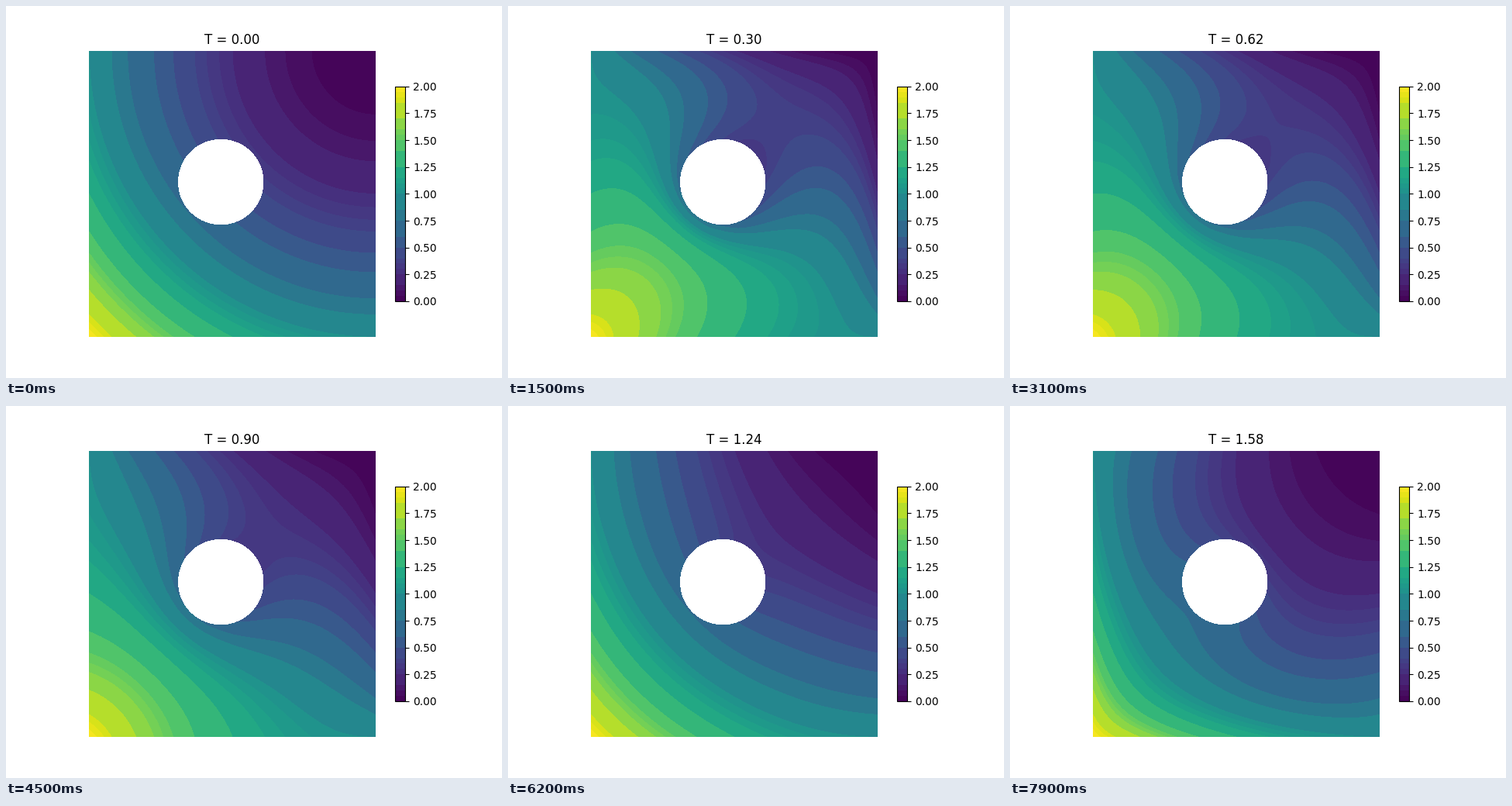
A matplotlib script for the animation above (8 s loop, 640 by 480 pixels).

```python
import numpy as np
import matplotlib.pyplot as plt
from matplotlib.animation import FuncAnimation
from matplotlib.cm import ScalarMappable
from matplotlib.colors import BoundaryNorm, ListedColormap
from matplotlib.patches import Circle

FRAMES, INTERVAL = 80, 100
DT = 0.02          # model time per frame
N, SUB = 80, 270   # grid cells per side, solver steps per frame
DIFF = 0.5         # diffusivity
WIND, OMEGA = 3.1, 1.5
HOLE, RADIUS = (0.46, 0.5415), 0.148

LEVELS = np.array([0, .05, .1, .15, .25, .3, .35, .4, .5, .6, .75, .85, 1,
                   1.05, 1.1, 1.15, 1.25, 1.4, 1.5, 1.55, 1.6, 1.7, 1.85,
                   1.9, 1.95, 2])
COLORS = plt.get_cmap("viridis")((LEVELS[:-1] + LEVELS[1:]) / 4)

grid = np.linspace(0, 1, N + 1)
X, Y = np.meshgrid(grid, grid)


def simulate():
    """Advection-diffusion with an oscillating diagonal wind, fixed edges."""
    h, dt = 1 / N, DT / SUB
    u = (1 - X) ** 2 + (1 - Y) ** 2
    dist = np.hypot(X - HOLE[0], Y - HOLE[1])
    free = (dist > RADIUS + 0.3 * h)[1:-1, 1:-1].astype(float)
    k = DIFF * dt / h ** 2
    states = [u.copy()]
    for step in range((FRAMES - 1) * SUB):
        drift = WIND * np.cos(OMEGA * step * dt) * dt / (2 * h)
        ahead = u[1:-1, 2:] + u[2:, 1:-1]
        behind = u[1:-1, :-2] + u[:-2, 1:-1]
        change = (k - drift) * ahead + (k + drift) * behind
        change -= 4 * k * u[1:-1, 1:-1]
        u[1:-1, 1:-1] += free * change
        if (step + 1) % SUB == 0:
            states.append(np.clip(u, 0, 2))
    return states


states = simulate()

fig = plt.figure(figsize=(6.4, 4.8), dpi=100, facecolor="white")
ax = fig.add_axes([107.2 / 640, 52.8 / 480, 369.6 / 640, 369.6 / 480])
ax.set(xlim=(0, 1), ylim=(0, 1))
ax.axis("off")
ax.add_patch(Circle(HOLE, RADIUS, color="white", lw=0, antialiased=False,
                    zorder=3))
title = ax.set_title("T = 0.00")

cax = fig.add_axes([501.6 / 640, 99 / 480, 13.86 / 640, 277.2 / 480])
bands = ScalarMappable(BoundaryNorm(LEVELS, len(COLORS)),
                       ListedColormap(COLORS))
fig.colorbar(bands, cax=cax, spacing="proportional", format="%.2f",
             ticks=np.arange(0, 2.01, 0.25))
cax.minorticks_off()

filled = None


def draw(i):
    global filled
    if filled is not None:
        filled.remove()
    filled = ax.contourf(X, Y, states[i], levels=LEVELS, colors=COLORS)
    title.set_text(f"T = {i * DT:.2f}")
    return filled, title


anim = FuncAnimation(fig, draw, frames=FRAMES, interval=INTERVAL, repeat=True)
plt.show()
```
